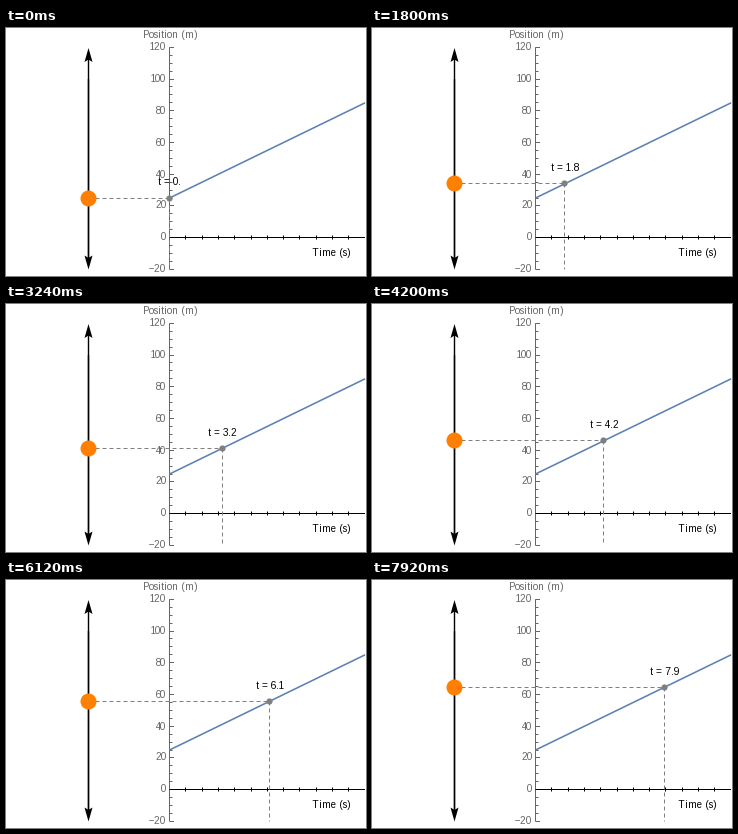
Animation of 360x248 px, one loop 8 s. Source, as a matplotlib script:

```python
import numpy as np
import matplotlib.pyplot as plt
from matplotlib.animation import FuncAnimation
from matplotlib.patches import Circle, Polygon

W, H, DPI = 360, 248, 100
PX = 72 / DPI                 # points per pixel
X0, Y0 = 163.5, 209.7         # graph origin in pixels
SX, SY = 16.3, 1.587          # pixels per second and per metre
TRACK = 82.5                  # x of the vertical track
START, SPEED = 25, 5
TICK_MS, HOLD = 40, 3         # the picture changes every 120 ms
GRAY, DASH = "#666666", "#808080"

plt.rcParams["font.family"] = "Liberation Sans"
plt.rcParams["text.hinting"] = "force_autohint"
plt.rcParams["text.hinting_factor"] = 1    # whole-pixel letter widths
fig = plt.figure(figsize=(W / DPI, H / DPI), dpi=DPI, facecolor="white")
ax = fig.add_axes([0, 0, 1, 1])
ax.set_xlim(0, W)
ax.set_ylim(H, 0)
ax.axis("off")


def px(t):
    return X0 + SX * t


def py(pos):
    return Y0 - SY * pos


def mid(v):
    """Centre of the pixel that holds v."""
    return np.floor(v) + 0.5


def line(xs, ys, color, width, z, **kw):
    return ax.plot(xs, ys, color=color, lw=width * PX, zorder=z, snap=False,
                   solid_capstyle="butt", dash_capstyle="butt", **kw)[0]


def text(x, y, s, color="black", ha="center"):
    return ax.text(x, y, s, fontsize=10 * PX, color=color, ha=ha,
                   va="baseline", zorder=8)


def arrow(start, tip, back):
    line([TRACK] * 2, [start, tip + 11 * back], "black", 1.4, 2)
    ys = [tip, tip + 14 * back, tip + 11.5 * back, tip + 14 * back]
    xs = [TRACK, TRACK - 4, TRACK, TRACK + 4]
    ax.add_patch(Polygon(list(zip(xs, ys)), fc="black", lw=0, zorder=2))


# Two overlapping arrows form the track
arrow(230, 20, 1)
arrow(py(100), 241.5, -1)

# Position axis
line([X0, X0], [py(120), py(-20)], GRAY, 1, 3)
for v in range(-20, 121, 5):
    major = v % 20 == 0
    y = mid(py(v))
    line([X0, X0 + (4.5 if major else 3)], [y, y], GRAY, 1, 3)
    if major:
        text(160, y + 3, str(v).replace("-", "\u2212"), GRAY, "right")
text(164.2, 10.5, "Position (m)", GRAY)

# Time axis
base = mid(Y0)
line([X0, 359], [base, base], "black", 1, 3)
for s in range(1, 12):
    x = mid(px(s))
    line([x, x], [base - 2, base + 2], "black", 1, 3)
text(326, 228, "Time (s)")

line([px(0), px(12)], [py(START), py(START + SPEED * 12)], "#5e81b5", 1.6, 4)

# Moving parts
across = line([], [], DASH, 1, 5, dashes=(4, 3))
down = line([], [], DASH, 1, 5, dashes=(4, 3))
ball = ax.add_patch(Circle((TRACK, 0), 8, fc="#ff8000", lw=0, zorder=6))
dot = ax.add_patch(Circle((0, 0), 3.1, fc=DASH, lw=0, zorder=6))
label = text(0, 0, "")


def update(i):
    t = (i // HOLD) * HOLD * TICK_MS / 1000
    x, y = px(t), py(START + SPEED * t)
    row, col = mid(y), mid(x)
    across.set_data([TRACK, x], [row, row])
    down.set_data([col, col], [row, py(-20)])
    ball.center = TRACK, row
    dot.center = col, row
    label.set_position((x + 0.3, y - 12.6))
    label.set_text("t = " + f"{t:.1f}".removesuffix("0") if t else "t = 0.")
    return across, down, ball, dot, label


anim = FuncAnimation(fig, update, frames=200, interval=TICK_MS,
                     init_func=lambda: update(0), repeat=True, repeat_delay=0)
plt.show()
```
